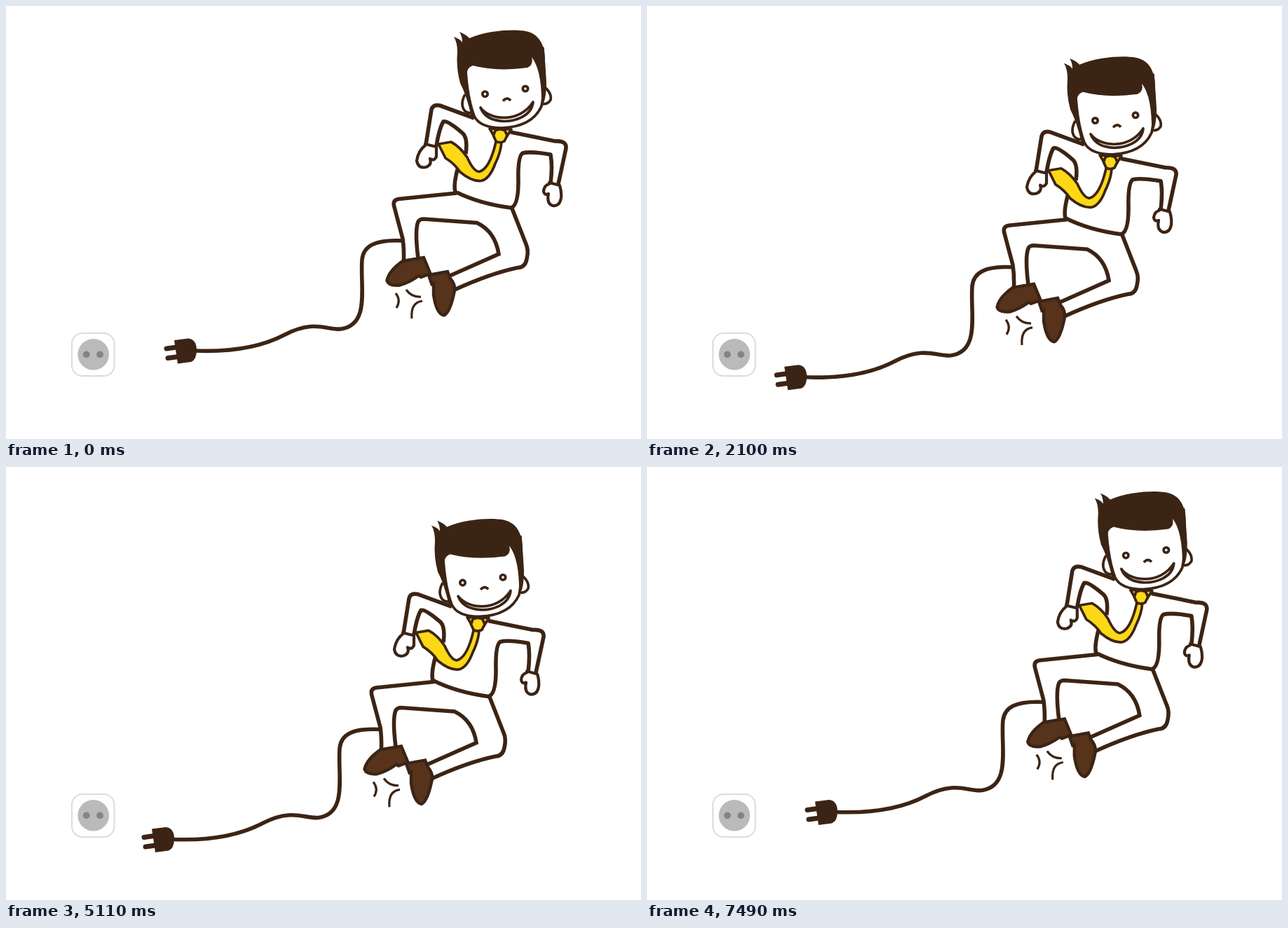
These frames come from a looping animation (906 by 618 pixels, 7560 ms). An HTML page:

```html
<!DOCTYPE html>
<html lang="en">
<head>
<meta charset="utf-8">
<title>Unplugged jump</title>
<style>
  html, body { margin: 0; width: 100%; height: 100%; overflow: hidden; background: #fff; }
  svg { display: block; width: 906px; height: 618px; }
  #jumper { stroke: #3c2415; stroke-width: 5.6; stroke-linejoin: round; fill: none; }
  .white { fill: #fff; }
  .dark { fill: #3c2415; stroke: none; }
  .thin { stroke-width: 3.7; }
  .tie { fill: #fcd816; stroke-width: 3.7; }
  .shoe { fill: #57331b; stroke-width: 4.4; stroke-linejoin: miter; }
</style>
</head>
<body>
<svg viewBox="0 0 906 618">
  <!-- wall socket -->
  <rect x="94" y="467" width="60.5" height="61" rx="15" fill="#fff" stroke="#dcdcdc" stroke-width="2"/>
  <circle cx="124.7" cy="497.3" r="22.3" fill="#bababa"/>
  <g fill="#848484"><circle cx="114.7" cy="497.4" r="4.9"/><circle cx="134" cy="497.4" r="4.9"/></g>

  <g id="jumper">
    <!-- plug and cord -->
    <path d="M270 492C320 494 362 488 398 469C440 447 458 463 478 461C520 455 505 400 508 362C510 343 525 333 566 335"/>
    <path d="M229 489L243 487M231 502.5L246 500.5" stroke-width="7" stroke-linecap="round"/>
    <path class="dark" d="M240 477L260 474.500Q272 476 272 491Q272 505 264 508L245 510.500Z"/>

    <!-- trousers -->
    <path d="M643 267L560 275.500Q552 277 553.500 285L566 332Q568 346 567.500 364M588 360Q583 320 588 308Q590 304 596 304L672 309.500Q698 322 703 354L631 386M640 405Q690 382 730 373.500Q741 373 743 361Q746 349 742 340L722 289" stroke-linejoin="miter"/>

    <!-- shirt and arms -->
    <path d="M668 160L619 142Q609 140 607 148L599 198M614 200Q618 175 624 165Q630 163 652 182Q659 189 656 211M645 230Q638 255 641 265Q675 282 720 288Q731 286 731 250Q730 215 737 210Q748 207 777 212Q780 228 777 253M720 180L784 193Q800 192 799 203L788 254"/>

    <!-- hands -->
    <g class="white" stroke-width="4.2">
      <path d="M598 197L614 201L614 215Q611 222 605 218Q608 227 599 230Q588 232 586 221Q588 207 598 199Z"/>
      <path d="M775 252L790 256Q793 266 792 274Q790 286 780 285Q771 282 774 268Q768 271 767 264Q768 256 775 254Z"/>
    </g>

    <!-- shoes -->
    <path class="shoe" d="M566 364L596 359L605.500 382L592 387L589 385Q575 395 562 398.500Q546 400 543.500 392Q546 378 566 364Z"/>
    <path class="shoe" d="M603 384L630 379L634 389Q641 397 640 406Q634 437 625 441.500Q614 440 610 412L610 396L607.500 397Z"/>
    <path d="M556 410Q564 420 557 431M571 405Q579 416 592 415M594 421Q577 423 579 446" stroke-width="3.2"/>

    <!-- tie -->
    <path class="tie" d="M699 194Q690 233 675 236.500Q667 236 658 216Q648 201 635 194L617 197L627 217Q640 225 648 237Q665 251 678 249.500Q690 247 698 225Q706 209 707 194Z"/>
    <path class="tie" d="M690 175L697 187L714 187L721 176Z"/>
    <path class="tie" d="M698 178Q705 174 712 178L715 185L711 193Q705 196.500 699 193L695.500 185Z"/>

    <!-- head -->
    <path class="white thin" d="M655 126Q647 141 655 150Q660 154 666 152M769 116Q779 125 777 134Q772 142 763 139"/>
    <path class="white thin" d="M655 70Q656 125 668 157Q676 174 708 174Q751 172 764 143Q770 115 766 60Z"/>
    <path class="dark" d="M639 44Q648 47 651 52Q651 43 647 37Q657 41 661 46C690 34 725 33 742 36C762 40 769 58 769 78L771 108Q771 136 764 143Q765 92 750 73Q753 84 744 88Q700 94 666 85Q656 88 657 103Q658 130 670 161L664 158Q657 127 648 110Q642 88 644 66Q644 52 639 44Z"/>
    <g class="white thin">
      <circle cx="683.500" cy="125.700" r="3.700"/>
      <circle cx="741" cy="118" r="3.700"/>
      <path d="M709 135.500Q715 129 720 135"/>
      <path d="M677 145C691 164 733 167 752 137C750 158 725 164.500 711 164.500C695 164 682 158 677 145Z"/>
    </g>
  </g>
</svg>
<script>
const jumper = document.getElementById('jumper');
const LOOP = 7560, TICK = 70, GAP = 210;
// Offsets along the outward drift, GAP ms apart; the way back retraces it.
const xs = [0, -1.8, -6.5, -14.5, -25, -35.5, -44, -49.5, -52, -49.5, -44, -37, -29.5, -22.7, -16.2, -12.5, -12.2, -15.5, -22];
const ys = [0, 3, 8, 13.5, 19, 24.5, 29, 32, 34.5, 36.5, 37.8, 39, 39.5, 38.8, 37.5, 35.7, 33.8, 32, 31];

function spline(v, pos) {
  const last = v.length - 1;
  const i = Math.min(Math.floor(pos), last - 1), u = pos - i;
  const at = k => v[k < 0 ? -k : Math.min(k, last)];
  const a = at(i - 1), b = v[i], c = v[i + 1], d = at(i + 2);
  return b + u / 2 * (c - a + u * (2 * a - 5 * b + 4 * c - d + u * (3 * (b - c) + d - a)));
}

function draw(now) {
  const t = Math.floor(now % LOOP / TICK) * TICK;
  const pos = Math.min(t, LOOP - t) / GAP;
  jumper.setAttribute('transform', `translate(${spline(xs, pos)} ${spline(ys, pos)})`);
}

const start = performance.now();
function frame() {
  draw(performance.now() - start);
  requestAnimationFrame(frame);
}
frame();
</script>
</body>
</html>
```
